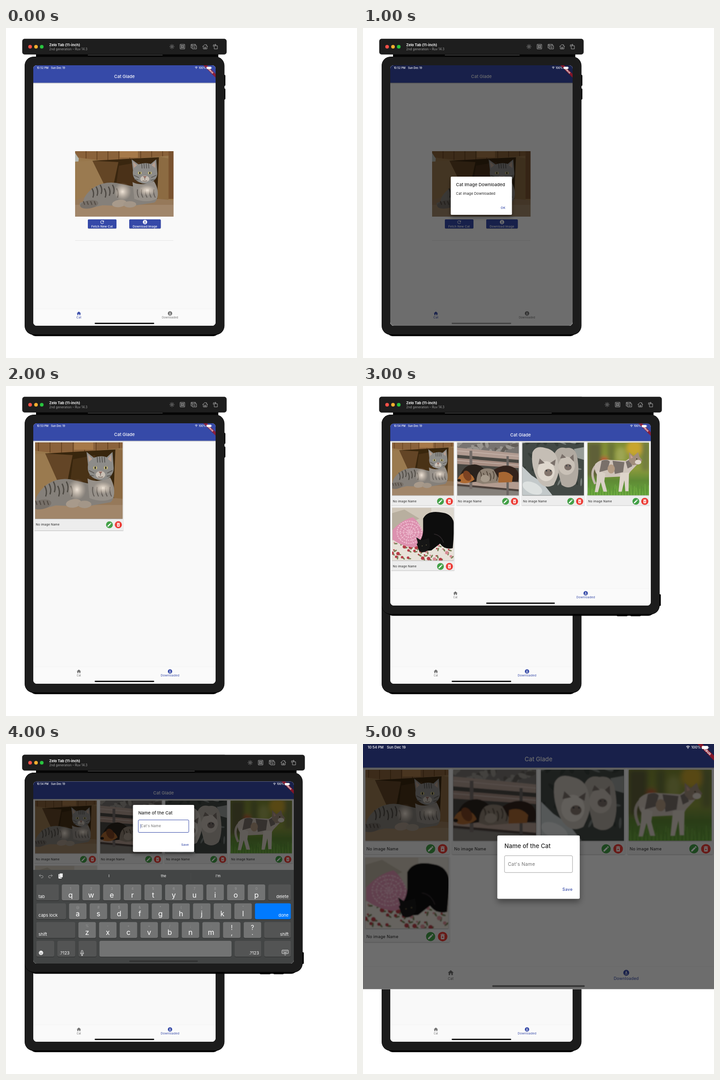
An HTML page for the animation above (6000 ms loop, 772x726 px).

```html
<!DOCTYPE html>
<html lang="en">
<head>
<meta charset="utf-8">
<title>Cat Glade</title>
<style>
html, body { margin: 0; width: 100%; height: 100%; overflow: hidden; background: #fff; }
#stage { display: block; width: 100%; height: 100%; }
text { font-family: Inter, Roboto, sans-serif; white-space: pre; }
.layer { animation: 6s step-end infinite; visibility: hidden; }
#home { animation-name: home; visibility: visible; }
#alert { animation-name: alert; }
#landscape { animation-name: landscape; }
#rename { animation-name: rename; }
#full { animation-name: full; }
@keyframes home { 33.33% { visibility: hidden; } }
@keyframes alert { 16.66% { visibility: visible; } 33.33% { visibility: hidden; } }
@keyframes landscape { 50% { visibility: visible; } 83.33% { visibility: hidden; } }
@keyframes rename { 66.66% { visibility: visible; } 83.33% { visibility: hidden; } }
@keyframes full { 83.33% { visibility: visible; } }
</style>
</head>
<body>
<svg id="stage" viewBox="0 0 772 726">
<defs>
  <linearGradient id="shade" x2="0" y2="1"><stop stop-opacity=".3"/><stop offset="1" stop-opacity="0"/></linearGradient>
  <linearGradient id="garden" x2="0" y2="1">
    <stop stop-color="#7f8b33"/><stop offset=".5" stop-color="#8c9a3c"/><stop offset=".72" stop-color="#5f8a35"/><stop offset="1" stop-color="#6aa63c"/>
  </linearGradient>
  <radialGradient id="glow"><stop stop-color="#f0e5d8"/><stop offset="1" stop-color="#d9c8b6" stop-opacity="0"/></radialGradient>
  <filter id="lift" x="-20%" y="-20%" width="140%" height="150%"><feDropShadow dx="0" dy="5" stdDeviation="5" flood-opacity=".4"/></filter>
  <filter id="low" x="-5%" y="-5%" width="110%" height="112%"><feDropShadow dx="0" dy=".7" stdDeviation=".6" flood-opacity=".35"/></filter>
  <filter id="soft"><feGaussianBlur stdDeviation=".6"/></filter>
  <filter id="bokeh"><feGaussianBlur stdDeviation="4"/></filter>
</defs>
</svg>
<script>
const BLUE = '#364aa8', GREY = '#707070';
const PORTRAIT = { w: 401, h: 573, bar: 131 };
const LANDSCAPE = { w: 573, h: 400.5, bar: 151 };

const rect = (x, y, w, h, fill, r = 0, extra = '') =>
  `<rect x="${x}" y="${y}" width="${w}" height="${h}" rx="${r}" fill="${fill}" ${extra}/>`;
const circle = (x, y, r, fill) => `<circle cx="${x}" cy="${y}" r="${r}" fill="${fill}"/>`;
const oval = (x, y, rx, ry, fill, turn = 0) =>
  `<ellipse rx="${rx}" ry="${ry}" fill="${fill}" transform="translate(${x} ${y}) rotate(${turn})"/>`;
const shape = (d, fill) => `<path d="${d}" fill="${fill}"/>`;
const line = (d, stroke, width = 1, extra = '') =>
  `<path d="${d}" fill="none" stroke="${stroke}" stroke-width="${width}" ${extra}/>`;
const at = (x, y, body, scale = 1) => `<g transform="translate(${x} ${y}) scale(${scale})">${body}</g>`;
const text = (x, y, label, size, fill, { weight = 400, anchor = 'start', gap = 0 } = {}) =>
  `<text x="${x}" y="${y}" font-size="${size}" fill="${fill}" font-weight="${weight}" text-anchor="${anchor}" letter-spacing="${gap}">${label}</text>`;
const middle = { anchor: 'middle' };
const seq = (n, draw) => Array.from({ length: n }, (_, i) => draw(i)).join('');
const photo = (id, x, y, w, h) => `<use href="#${id}" x="${x}" y="${y}" width="${w}" height="${h}"/>`;

// 24-unit icons
const ICONS = {
  home: 'M10 20v-6h4v6h5v-8h3L12 3 2 12h3v8z',
  down: 'M12 2a10 10 0 1 0 0 20 10 10 0 0 0 0-20zM11 6h2v4h3l-4 4-4-4h3zM7 15.5h10v2H7z',
  edit: 'M3 17.25V21h3.75L17.81 9.94l-3.75-3.75zM20.71 7.04c.39-.39.39-1.02 0-1.41l-2.34-2.34c-.39-.39-1.02-.39-1.41 0l-1.83 1.83 3.75 3.75z',
  bin: 'M6 19c0 1.1.9 2 2 2h8c1.1 0 2-.9 2-2V7H6zM8.5 11.9l1.4-1.4 2.1 2.1 2.1-2.1 1.4 1.4-2.1 2.1 2.1 2.1-1.4 1.4-2.1-2.1-2.1 2.1-1.4-1.4 2.1-2.1zM15.5 4l-1-1h-5l-1 1H5v2h14V4z',
  reload: 'M17.65 6.35A8 8 0 1 0 19.73 14h-2.08A6 6 0 1 1 16.22 7.78L13 11h7V4z'
};
const icon = (name, x, y, size, fill) =>
  `<path d="${ICONS[name]}" fill="${fill}" fill-rule="evenodd" transform="translate(${x} ${y}) scale(${size / 24}) translate(-12 -12)"/>`;

const symbol = (id, box, body) =>
  `<symbol id="${id}" viewBox="${box}" preserveAspectRatio="none">${body}</symbol>`;
const softly = body => `<g filter="url(#soft)">${body}</g>`;

const boxCat = softly(
  rect(-3, -3, 222, 150, '#8a623a') +
  seq(8, i => line(`M${24 + i * 24} 0v20`, '#5e3c1d', 1.4)) + rect(98, 0, 40, 14, '#a67949') +
  shape('M-3 13L70 22 216 9V147H-3z', '#98774c') +
  shape('M38 21L190 13 184 108 60 84z', '#39260f') +
  shape('M38 21L95 24 84 75 58 84z', '#634525') + shape('M96 32L142 24V75H90z', '#4a3118') +
  shape('M184 12L205 16V116L180 104z', '#8c6b42') + rect(205, 0, 15, 105, '#79522f') +
  shape('M0 4L8 16 4 62 0 65z', '#b7bbb5') +
  shape('M0 23L38 21 68 82 18 104 0 112z', '#9a7a50') +
  shape('M-3 109L45 92 216 108V147H-3z', '#96795a') + shape('M0 118L216 118V147H0z', '#a1866a') +
  shape('M18 111Q20 94 44 78 70 64 101 72L130 78 175 72Q188 101 174 113L122 121 60 119 30 126Q8 127 10 114z', '#85807a') +
  shape('M126 68Q145 78 173 66 186 87 179 105 158 115 130 105z', '#969089') +
  seq(7, i => line(`M${37 + i * 9} ${82 - i % 3 * 4}q6 10 2 20`, '#4d4843', 2.6)) +
  seq(5, i => line(`M${137 + i * 9} 84q-2 10 3 18`, '#625c57', 2)) +
  oval(104, 89, 19, 20, 'url(#glow)') + oval(158, 86, 20, 12, 'url(#glow)') +
  oval(31, 117, 20, 9, '#777069', -10) + oval(97, 115, 16, 8, '#a89a8b', -8) + oval(120, 117, 14, 7, '#a39688') +
  seq(4, i => line(`M${18 + i * 8} 110l3 8`, '#4f4740', 2)) +
  shape('M124 18L139 29Q154 24 166 28L178 18 180 44Q183 63 162 71 150 73 140 68 124 60 127 42z', '#8d8c89') +
  shape('M127 23L136 31 129 37zM175 23L168 31 176 37z', '#b79f90') +
  seq(4, i => line(`M${146 + i * 5} 27l1 11`, '#555350', 1.6)) +
  line('M129 53l11 5M178 53l-11 5M130 62l9 1M176 62l-10 2', '#5b5854', 1.5) +
  oval(142, 48, 4.2, 3, '#c0b577') + oval(164, 48, 4.2, 3, '#c0b577') + oval(142, 48, 1.4, 2.5, '#222') + oval(164, 48, 1.4, 2.5, '#222') +
  oval(153, 61, 10, 7, '#c8bfb5') + shape('M149 55h8l-4 5z', '#936b60') + line('M153 59v4m-5 2q5 2 10 0', '#54463f')
);

const bench = softly(
  rect(-2, -2, 140, 120, '#77736f') +
  seq(24, i => oval((i * 37) % 135, (i * 11) % 24, 8, 4, i % 3 ? '#98948e' : '#625d58', i * 40)) +
  rect(0, 26, 135, 66, '#4a4743') +
  shape('M0 11L135 24V38L0 27z', '#b09b91') + shape('M0 34L135 45V56L0 47z', '#a58c81') +
  line('M0 18L135 30M0 39L135 50', '#c7b5ac', 1.4) +
  shape('M0 82L135 87V105L0 92z', '#b29b8f') + line('M0 93L135 105', '#4b403a', 4) +
  shape('M0 97L135 108V118H0z', '#85807a') + rect(27, 18, 6, 84, '#746c68') + rect(108, 30, 5, 86, '#686360') +
  shape('M6 73Q15 48 38 48 62 50 72 83L23 88z', '#29211c') + shape('M1 80Q7 66 20 66 34 69 38 81 24 93 7 88z', '#ae6a31') +
  oval(22, 73, 8, 12, '#7b4222', -28) + oval(4, 83, 4, 3, '#221a17') +
  shape('M42 87Q43 58 62 57 86 55 95 78L89 88 56 91z', '#8d8072') +
  seq(6, i => line(`M${50 + i * 7} ${63 + i % 2 * 4}q5 8 1 17`, '#54493e', 2)) + oval(61, 79, 10, 8, '#a69a8b') +
  shape('M80 60Q105 44 126 56 139 66 133 85L96 87z', '#30241d') + shape('M91 66Q110 60 122 74L120 87 90 88z', '#a66632')
);

const snowCats = softly(
  rect(-2, -2, 140, 120, '#434844') +
  seq(32, i => oval((i * 43) % 135, (i * 29) % 116, 6 + i % 5, 2 + i % 3, i % 3 ? '#353c38' : '#747c78', i * 31)) +
  shape('M0 52L20 72 44 88 66 116H0z', '#c3c9ca') + shape('M113 14L135 10V38L121 34z', '#979c98') + oval(22, 100, 23, 12, '#dde1e0', 25) +
  shape('M69 28Q76 7 95 12 115 8 120 30 127 68 117 91 103 105 86 93z', '#b1aaa1') +
  shape('M22 22Q29 5 51 12 76 17 78 44 85 63 69 93 47 105 33 81 18 51 22 22z', '#c5beb5') +
  oval(52, 63, 19, 22, '#ded7cd') + oval(97, 51, 18, 20, '#c9c1b7') +
  shape('M35 48L38 35 49 45zM61 45L73 37 71 51zM83 35L87 25 96 33zM104 33L112 26 113 42z', '#7a706a') +
  oval(57, 66, 9, 8, '#84766d') + oval(100, 54, 8, 7, '#7a6e67') +
  circle(53, 62, 1.4, '#252e36') + circle(62, 62, 1.4, '#252e36') + circle(97, 51, 1.2, '#252e36') + circle(104, 51, 1.2, '#252e36')
);

const calico = rect(0, 0, 135, 116, 'url(#garden)') +
  `<g filter="url(#bokeh)">${rect(0, 0, 30, 75, '#5f6138') + rect(45, 0, 14, 60, '#697338') + oval(103, 12, 18, 18, '#c8a52e') + oval(73, 28, 11, 18, '#9da553') + rect(119, 0, 16, 62, '#727d41') + oval(37, 38, 6, 6, '#d64237')}</g>` +
  softly(
    seq(45, i => line(`M${i * 3.1} 116l${i % 5 - 2}-${10 + i * 7 % 17}`, i % 2 ? '#74b345' : '#518d32', 1)) +
    line('M19 50Q4 65 17 91', '#c4b8ae', 5) +
    shape('M17 47Q28 35 48 38L84 40 98 30 111 46 94 64 88 74 27 77Q12 64 17 47z', '#cfc4ba') +
    shape('M21 61L39 68 37 85 43 108H35L29 87 23 109H16L20 84z', '#d9d0c6') +
    shape('M72 67L91 66 90 107H83L81 83 75 108H68z', '#ded4ca') +
    shape('M31 40Q43 35 49 42L44 60 26 65zM55 40L81 43 78 65 60 69zM84 42L95 36 98 52 88 57z', '#79706b') +
    oval(52, 58, 8, 10, '#b49b83') +
    shape('M91 21L101 30 111 21 114 31 120 39 113 48 99 50 91 41z', '#a18d7b') + oval(111, 43, 7, 5, '#e0d6cb') +
    circle(108, 36, 1.3, '#353218') + shape('M94 26l6 7-5 2z', '#ca9f91')
  );

const blackCat = softly(
  rect(-2, -2, 140, 120, '#cfc6b8') + rect(86, 0, 49, 35, '#ddd8cf') + shape('M0 72L135 65V118H0z', '#e8e2d9') + shape('M0 12L27 4 60 24 0 49z', '#b8af9f') +
  seq(34, i => {
    const x = (i * 31 + 5) % 133, y = 77 + (i * 17) % 38;
    return oval(x + 3, y + 2, 4, 1.6, '#758052', i * 35) + circle(x, y, 1.8 + i % 3, i % 4 ? '#b53d46' : '#d68d94');
  }) +
  shape('M1 49Q22 26 46 21 64 36 71 65 56 90 42 87 18 83 1 70z', '#dc91af') +
  seq(4, i => `<ellipse cx="38" cy="54" rx="${6 + i * 7}" ry="${5 + i * 6.5}" fill="none" stroke="#f2c4d5" stroke-width="2" stroke-dasharray="3 2"/>`) +
  seq(10, i => `<path d="M38 54h26" stroke="#edb8cd" transform="rotate(${i * 36} 38 54)"/>`) +
  shape('M68 24Q78 4 111 11 134 14 137 40L133 89Q115 93 105 79L86 94 60 96 54 80Q67 70 68 51z', '#0e0d0e') +
  shape('M56 76L53 65 64 72 81 67 83 84Q79 99 65 98 55 95 56 76z', '#171517') +
  line('M92 58Q107 60 113 77', '#302b2d', 1.5) + circle(66, 84, 1, '#736a49') + circle(75, 82, 1, '#736a49')
);

function toolbar(w) {
  const ink = '#a9a9a9', shift = w - 449;
  const tools = [
    [365, seq(8, i => `<path d="M3.6 0h1.6" stroke="${ink}" transform="rotate(${i * 45})"/>`) + line('M2 0a2 2 0 1 0-4 0 2 2 0 1 0 4 0', ink)],
    [388, line('M-5-5H5V5H-5zM-2-2h4v4h-4z', ink) + line('M-2-1v-2h-1v1h6v-1h-1v6h1v-1h-6v1h1z', ink, .7)],
    [413, line('M-4-1V-5H-6V3h2M-4-5H4v2M-3-2H0l1-1h2l1 1h2V5H-3z', ink) + line('M3 1.5a1.6 1.6 0 1 0-3.2 0 1.6 1.6 0 1 0 3.2 0', ink, .9)],
    [438, line('M-6 0L0-5 6 0M-4-1V5H4V-1M-1 5V1H1V5M3-5v3', ink)],
    [461, line('M-3-2H4V5H-3zM-5 0v-4h6M-1-6l2 2-2 2', ink)]
  ];
  return rect(36, 24, w, 34, '#1e1e1e', 5, 'stroke="#111" stroke-width=".6"') +
    circle(53, 41.2, 4, '#fb5149') + circle(66, 41.2, 4, '#f9af2f') + circle(78.6, 41.2, 4, '#29c53f') +
    text(95, 39.8, 'Zelo Tab (11-inch)', 7.9, '#f4f4f4', { weight: 700 }) +
    text(95, 49.2, '2nd generation – Ruv 14.3', 6.9, '#a0a0a0') +
    tools.map(([x, art]) => at(x + shift, 41, art)).join('');
}

function device({ w, h }, buttons) {
  return rect(66, 58, w, 6, '#050505') + line(`M180 59.6h${w * .41}`, '#777', .8) +
    buttons + rect(52, 640 - 573 + h, w + 16, 38, '#000', 14) +
    rect(41, 63, w + 38.5, h + 39, '#000', 20) + rect(41.4, 63.4, w + 37.6, h + 37.6, '#1c1c1c', 19);
}

function statusBar(w, time) {
  const white = '#fff', bold = { weight: 500 };
  return text(7.7, 7.6, time, 5.8, white, bold) + text(39, 7.6, 'Sun Dec 19', 5.8, white, bold) +
    at(w - 42.5, 7.6, line('M-2.8-3.2q2.8-2.4 5.6 0M-1.6-1.8q1.6-1.3 3.2 0', white, .9) + circle(0, -.6, .7, white)) +
    text(w - 21.5, 7.6, '100%', 5.8, white, { weight: 500, anchor: 'end' }) +
    rect(w - 20, 3.2, 10.5, 5, white, 1.4) + rect(w - 9, 4.8, .7, 1.8, white, .3);
}

const banner = w => `<g transform="translate(${w} 0) rotate(45)">` +
  rect(-19.2, 13.4, 38.4, 5.8, '#a0141f', 0, 'opacity=".78"') +
  text(0, 18.1, 'DEBUG', 4.9, '#fff', { weight: 800, anchor: 'middle' }) + '</g>';

let clips = 0;
function app(size, { time, active, body, overlay = '', pill = '#000', radius = 8 }) {
  const { w, h, bar } = size, id = `clip${clips++}`;
  const tab = (name, label, x, on) => icon(name, x, h - 27, 11.5, on ? BLUE : GREY) +
    text(x, h - 15.6, label, on ? 6.7 : 5.8, on ? BLUE : GREY, { anchor: 'middle', gap: .12 });
  return `<clipPath id="${id}">${rect(0, 0, w, h, '#000', radius)}</clipPath><g clip-path="url(#${id})">` +
    rect(0, 0, w, h, '#f9f9f9') + body +
    rect(0, 38, w, 3, 'url(#shade)') + rect(0, 0, w, 38.5, BLUE) +
    text(w / 2, 28, 'Cat Glade', 9.6, '#fff', { weight: 500, anchor: 'middle', gap: .05 }) +
    rect(0, h - 37, w, 37, '#fafafa') + rect(0, h - 37.3, w, .5, '#ededed') +
    tab('home', 'Cat', w / 4, active === 0) + tab('down', 'Downloaded', w * 3 / 4, active === 1) +
    overlay + rect((w - bar) / 2, h - 6.6, bar, 2.8, pill, 1.4) +
    banner(w) + statusBar(w, time) + '</g>';
}

function button(x, w, name, label) {
  return rect(x, 339, w, 20, BLUE, 2, 'filter="url(#low)"') + icon(name, x + w / 2, 345, 11.5, '#fff') +
    text(x + w / 2, 356.9, label, 6.5, '#fff', { weight: 500, anchor: 'middle', gap: .15 });
}

function card(id, x, y, w, h) {
  const foot = y + h + 13.2;
  return rect(x - 2, y - 2, w + 4, h + (w > 150 ? 28 : 24), '#ededed', 1.5, 'filter="url(#low)"') +
    `<g filter="url(#low)">${photo(id, x, y, w, h)}</g>` +
    text(x + 1.6, foot + 2.2, 'No image Name', 6.7, '#222', { gap: .12 }) +
    circle(x + w - 29, foot, 7.5, '#43a047') + icon('edit', x + w - 29, foot, 11.5, '#fff') +
    circle(x + w - 9.4, foot, 7.8, '#ec3b35') + icon('bin', x + w - 9.4, foot, 11.5, '#fff');
}

const barrier = ({ w, h }) => rect(0, 0, w, h, '#000', 0, 'opacity=".56"');

function dialog(x, y, h, title, action, body) {
  return at(x, y, rect(0, 0, 134.5, h, '#fff', 2, 'filter="url(#lift)"') +
    text(11.6, 20.6, title, 9.6, '#222', { weight: 500, gap: .07 }) + body +
    text(123, h - 13.2, action, 6.7, BLUE, { weight: 500, anchor: 'end', gap: .3 }));
}

const nameDialog = (y, focused) => dialog(219.3, y, 103.3, 'Name of the Cat', 'Save',
  rect(11.7, 33, 111, 27.5, 'none', 2, `stroke="${focused ? BLUE : '#8a8a8a'}" stroke-width="${focused ? 1 : .6}"`) +
  text(17.3, 49.2, "Cat's Name", 7.7, '#707070', { gap: .2 }) +
  (focused ? rect(16.5, 42, .8, 9.5, BLUE) : ''));

function keyboard() {
  const step = 45.45;
  const key = (x, y, w, fill) => rect(x, y + 1, w, 35, '#2b2c2c', 3.5) + rect(x, y, w, 35, fill, 3.5);
  const special = (x, y, w, label = '', right, fill = '#535454') => key(x, y, w, fill) +
    text(right ? x + w - 5 : x + 5, y + 30, label, 9.3, '#fff', { anchor: right ? 'end' : 'start' });
  const row = (x, y, letters, hints) => [...letters].map((c, i) => {
    const left = x + i * step, mid = left + 19.2, mark = '!?'.includes(c);
    return key(left, y, 38.5, '#727373') + (mark
      ? text(mid, y + 17, c, 14, '#fff', middle) + text(mid, y + 28, c === '!' ? ',' : '.', 14, '#fff', middle)
      : text(mid, y + 11.6, hints[i], 7.5, '#999', middle) + text(mid, y + 28.6, c, 16, '#fff', middle));
  }).join('');
  const undo = line('M-1-4L-4-1-1 2M-4-1H2a2.5 2.5 0 0 1 0 5H0', '#a4a4a4');
  return at(-60, -82.5,
    rect(60, 277, 573, 207, '#434545') +
    at(77, 290.5, undo) + `<g transform="translate(98 290.5) scale(-1 1)">${undo}</g>` +
    rect(115.5, 286, 7, 10, '#fff', 1) + rect(118, 284.5, 7, 9, '#fff', 1, 'stroke="#434545" stroke-width=".7"') +
    ['I', 'the', "I'm"].map((word, i) => text(226.5 + i * 120, 293.4, word, 7.7, '#fff', middle)).join('') +
    rect(406.5, 284, .6, 15, '#515353') +
    special(66.5, 309, 50, 'tab') + row(122.6, 309, 'qwertyuiop', '1234567890') + special(577, 309, 49.6, 'delete', true) +
    special(66.5, 350.4, 65.5, 'caps lock') + row(138.6, 350.4, 'asdfghjkl', `@#$${'&'}*()'"`) + special(547.5, 350.4, 79, 'done', true, '#007aff') +
    special(66.5, 391.8, 86, 'shift') + row(159.2, 391.8, 'zxcvbnm!?', '%-+=/;:') + special(568, 391.8, 58.6, 'shift', true) +
    special(66.5, 433, 39.5) + special(113, 433, 39.5, '.?123') + special(159.5, 433, 39.5) +
    key(205.5, 433, 290.5, '#727373') + special(503, 433, 58.5, '.?123', true) + special(568, 433, 58.6) +
    circle(77, 459.5, 4.7, '#fff') + circle(75.3, 458.3, .8, '#434545') + circle(78.7, 458.3, .8, '#434545') + line('M74.4 460.5q2.6 3 5.2 0', '#434545') +
    rect(165.6, 454, 3.4, 7, 'none', 1.7, 'stroke="#fff" stroke-width=".9"') + line('M163.7 459q0 4 3.6 4t3.6-4M167.3 463v2.5m-2 0h4', '#fff', .9) +
    rect(607, 453.5, 14, 7.5, 'none', 1, 'stroke="#fff" stroke-width=".9"') +
    line('M609 455.8h10M609 457.5h10', '#fff', .8, 'stroke-dasharray="1 .8"') + line('M611 459.2h6M612 463l2 1.6 2-1.6', '#fff', .8));
}

const homeBody = photo('boxCat', 92, 189, 216.5, 144) +
  button(120, 63, 'reload', 'Fetch New Cat') + button(211, 69.5, 'down', 'Download Image') +
  rect(92, 385.3, 216, .6, '#d9d9d9');
const album = ['boxCatCrop', 'bench', 'snowCats', 'calico', 'blackCat']
  .map((id, i) => card(id, 4 + i % 4 * 143.25, 42 + (i >> 2) * 143.25, 135.4, 116)).join('');

const home = { time: '10:52 PM', active: 0, body: homeBody };
const gallery = { time: '10:54 PM', active: 1, body: album };
const alertBox = dialog(133, 245, 84, 'Cat Image Downloaded', 'OK',
  text(11.6, 39.8, 'Cat image Downloaded', 7.7, '#222', { gap: .1 })).replace('x="123"', 'x="120.4"');
const layer = (id, body) => `<g id="${id}" class="layer">${body}</g>`;
const tall = options => at(60, 82, app(PORTRAIT, options));
const wide = options => at(60, 82.5, app(LANDSCAPE, options));

const symbols = symbol('boxCat', '0 0 216 144', boxCat) + symbol('boxCatCrop', '17 0 182 144', boxCat) +
  Object.entries({ bench, snowCats, calico, blackCat }).map(([id, art]) => symbol(id, '0 0 135 116', art)).join('');

document.getElementById('stage').innerHTML += symbols +
  device(PORTRAIT, rect(476, 103, 6.5, 24.5, '#080808', 2) + rect(476, 133, 6.5, 24.5, '#080808', 2)) + toolbar(449) +
  tall({ time: '10:53 PM', active: 1, body: card('boxCatCrop', 4, 42, 192.5, 168) }) +
  layer('home', tall(home)) +
  layer('alert', tall({ ...home, overlay: barrier(PORTRAIT) + alertBox, pill: '#414141' })) +
  layer('landscape',
    device(LANDSCAPE, rect(558, 500, 24, 6.5, '#080808', 2) + rect(588, 500, 23, 6.5, '#080808', 2) + rect(649, 458, 6, 26, '#080808', 2)) +
    toolbar(621) + wide(gallery)) +
  layer('rename', wide({ ...gallery, overlay: barrier(LANDSCAPE) + nameDialog(51.5, true) + keyboard(), pill: '#303131' })) +
  layer('full', at(0, 0, app(LANDSCAPE, { ...gallery, overlay: barrier(LANDSCAPE) + nameDialog(149.4, false), pill: '#353535', radius: 0 }), 772 / 573));
</script>
</body>
</html>
```
